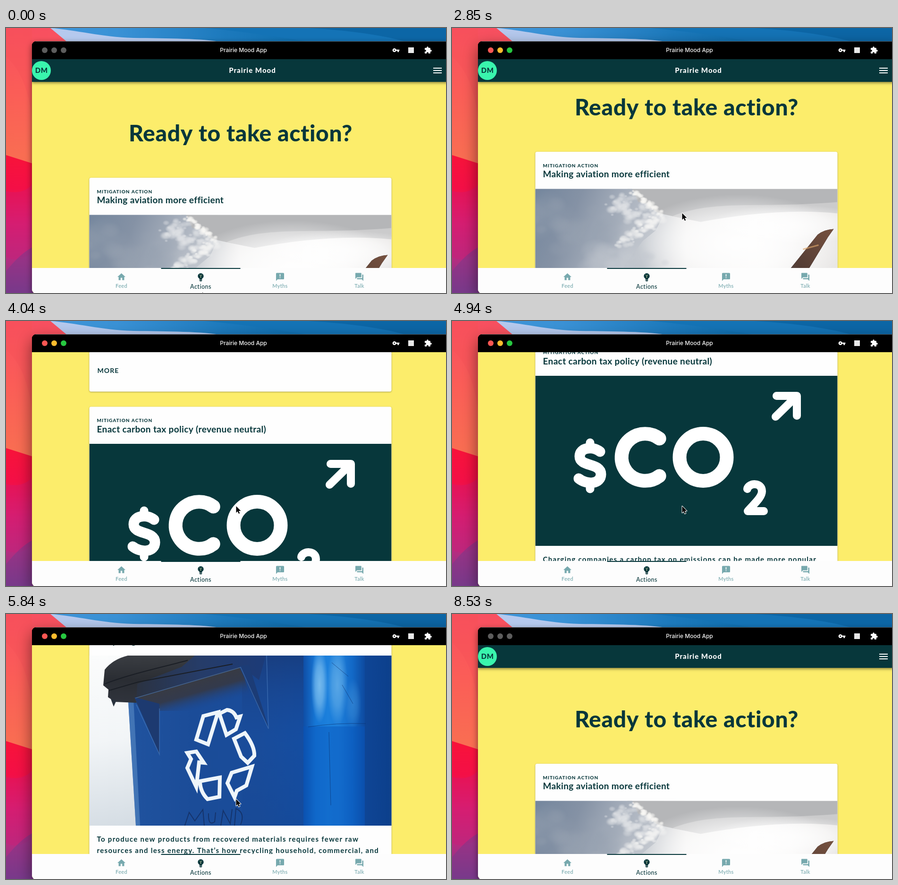
An HTML page with a canvas that plays this animation: 932x561 px, repeating every 8.55 s.

```html
<!DOCTYPE html>
<html lang="en">
<head>
<meta charset="utf-8">
<title>Prairie Mood App</title>
<style>
html, body { margin: 0; width: 100%; height: 100%; overflow: hidden; background: #07373b; }
canvas { display: block; width: 100vw; height: 100vh; }
</style>
</head>
<body>
<canvas id="stage" width="932" height="561"></canvas>
<script>
const ctx = document.getElementById('stage').getContext('2d');
const LOOP = 8550, W = 932, H = 561;
const DARK = '#07373b', YELLOW = '#fced6b', TEAL = '#77a9ae', FONT = 'Lato, sans-serif';
const LEFT = 176.5, CARD_W = 640, IMG_H = 360;

// Rows: time, scroll offset
const SCROLL = [
  [2700, 0], [2850, 55], [3000, 190], [3150, 350], [3300, 470], [3440, 565.5],
  [3740, 700], [4040, 790], [4340, 848], [4640, 880], [4790, 880], [4940, 934],
  [5090, 1090], [5240, 1260], [5390, 1400], [5540, 1510], [5690, 1585], [5840, 1616.5],
  [6440, 1616.5], [6590, 1250], [6740, 350], [6890, -24.5], [7040, -15], [7190, -7],
  [7340, -2], [7490, 0]
];
// Rows: time, app bar offset
const BAR = [[2850, 0], [3000, -28], [3150, -56], [6440, -56], [6590, -30], [6740, -4], [6890, 0]];
// Rows: time, pointer x, pointer y
const POINTER = [
  [0, 416, 559.5], [300, 411, 546], [600, 400, 530], [750, 400, 530], [1050, 412, 529],
  [1200, 422, 531], [1650, 422, 531], [1800, 432, 515], [2100, 470, 440], [2400, 487.5, 392]
];

const CARDS = [
  { title: 'Making aviation more efficient', paint: paintWing, lines: [
    'Various technologies and operational practices such as using better',
    'engines, wingtips, and light weighting to improve fuel efficiency can lower',
    'airplane emissions.'] },
  { title: 'Enact carbon tax policy (revenue neutral)', paint: paintTax, lines: [
    'Charging companies a carbon tax on emissions can be made more popular',
    'by returning the money raised to households, so that most people do not',
    'pay more overall.'] },
  { title: 'Recycling', paint: paintBin, lines: [
    'To produce new products from recovered materials requires fewer raw',
    'resources and less energy. That’s how recycling household, commercial, and',
    'industrial waste lowers emissions.'] }
];

const ICON = {
  key: 'M12.65 10C11.83 7.67 9.61 6 7 6c-3.31 0-6 2.69-6 6s2.69 6 6 6c2.61 0 4.83-1.67 5.65-4H17v4h4v-4h2v-4H12.65zM7 14c-1.1 0-2-.9-2-2s.9-2 2-2 2 .9 2 2-.9 2-2 2z',
  puzzle: 'M20.5 11H19V7c0-1.1-.9-2-2-2h-4V3.5C13 2.12 11.88 1 10.5 1S8 2.12 8 3.5V5H4c-1.1 0-2 .9-2 2v3.8h1.5c1.49 0 2.7 1.21 2.7 2.7s-1.21 2.7-2.7 2.7H2V20c0 1.1.9 2 2 2h3.8v-1.5c0-1.49 1.21-2.7 2.7-2.7s2.7 1.21 2.7 2.7V22H17c1.1 0 2-.9 2-2v-4h1.5c1.38 0 2.5-1.12 2.5-2.5S21.88 11 20.5 11z',
  home: 'M10 20v-6h4v6h5v-8h3L12 3 2 12h3v8z',
  myth: 'M20 2H4c-1.1 0-2 .9-2 2v18l4-4h14c1.1 0 2-.9 2-2V4c0-1.1-.9-2-2-2zm-7 9h-2V5h2v6zm0 4h-2v-2h2v2z',
  talk: 'M21 6h-2v9H6v2c0 .55.45 1 1 1h11l4 4V7c0-.55-.45-1-1-1zm-4 6V3c0-.55-.45-1-1-1H3c-.55 0-1 .45-1 1v14l4-4h10c.55 0 1-.45 1-1z',
  bulb: 'M12 3c-4 0-7.2 3.1-7.2 7 0 2.8 1.6 5 3.9 6.2V19h6.6v-2.8c2.3-1.2 3.9-3.4 3.9-6.2 0-3.9-3.2-7-7.2-7zM8.7 20h6.6v1.5l-1.5 1.5h-3.6l-1.5-1.5z',
  arrow: 'M0 0V14L3.2 11 5.5 16 7.700 15 5.500 10.100H9.900z'
};
for (const k in ICON) ICON[k] = new Path2D(ICON[k]);

function valuesAt(rows, t) {
  const i = rows.findIndex(r => r[0] > t);
  if (i < 0) return rows[rows.length - 1].slice(1);
  if (i === 0) return rows[0].slice(1);
  const a = rows[i - 1], b = rows[i], k = (t - a[0]) / (b[0] - a[0]);
  return a.slice(1).map((v, j) => v + (b[j + 1] - v) * k);
}

// The picture advances in held steps of about 150 ms.
function hold(t) {
  if (t < 3440) return Math.min(3300, Math.floor(t / 150) * 150);
  return 3440 + Math.floor((t - 3440) / 150) * 150;
}

function rect(x, y, w, h, fill) { ctx.fillStyle = fill; ctx.fillRect(x, y, w, h); }
function disc(x, y, r, fill) {
  ctx.fillStyle = fill; ctx.beginPath(); ctx.arc(x, y, r, 0, 7); ctx.fill();
}
function round(x, y, w, h, r) { ctx.beginPath(); ctx.roundRect(x, y, w, h, r); }
function fillPath(d, fill) { ctx.fillStyle = fill; ctx.fill(new Path2D(d)); }
function strokePath(d, width, color) {
  ctx.lineWidth = width; ctx.strokeStyle = color; ctx.stroke(new Path2D(d));
}
function grad(x0, y0, x1, y1, ...colors) {
  const g = ctx.createLinearGradient(x0, y0, x1, y1);
  colors.forEach((c, i) => g.addColorStop(i / (colors.length - 1), c));
  return g;
}
function blob(x, y, r, rgb, alpha, squash = 1) {
  ctx.save();
  ctx.translate(x, y); ctx.scale(1, squash);
  const g = ctx.createRadialGradient(0, 0, 0, 0, 0, r);
  g.addColorStop(0, `rgba(${rgb},${alpha})`);
  g.addColorStop(.5, `rgba(${rgb},${alpha * .7})`);
  g.addColorStop(1, `rgba(${rgb},0)`);
  disc(0, 0, r, g);
  ctx.restore();
}
function text(s, x, y, font, color, spacing = 0, align = 'left') {
  ctx.font = font; ctx.fillStyle = color; ctx.textAlign = align;
  ctx.letterSpacing = spacing + 'px';
  ctx.fillText(s, x, y);
  ctx.letterSpacing = '0px';
}
function icon(path, cx, cy, size, color) {
  ctx.save();
  ctx.translate(cx - size / 2, cy - size / 2); ctx.scale(size / 24, size / 24);
  ctx.fillStyle = color; ctx.fill(path);
  ctx.restore();
}
function random(seed) {
  return () => (seed = (seed * 16807) % 2147483647) / 2147483647;
}
// Scatters soft puffs around a line.
function puffs(seed, n, x0, y0, x1, y1, spread, size, rgb, alpha) {
  const rnd = random(seed * 7919);
  for (let i = 0; i < n; i++) {
    const k = rnd();
    blob(x0 + (x1 - x0) * k + (rnd() + rnd() - 1) * spread, y0 + (y1 - y0) * k + (rnd() + rnd() - 1) * spread,
      size * (.4 + rnd()), rgb, alpha, .75);
  }
}

function wallpaper() {
  rect(0, 0, W, H, grad(0, 0, 700, 0, '#3f97dc', '#3a92d6', '#1c79bc', '#0869a8'));
  fillPath('M420 0C520 8 600 24 650 30H932V0z', '#1473b6');
  fillPath('M640 0C700 3 790 12 850 30H932V0z', '#0c66a6');
  fillPath('M92 0C150 4 200 19 270 21C340 22 420 22 456 30H100z', '#b5c9ee');
  fillPath('M0 0H94L130 30L140 561H0z', grad(0, 0, 0, 270, '#f84f60', '#fb5d57', '#f96d52'));
  fillPath('M0 60Q45 100 55 190V0H0z', 'rgba(245,80,85,.4)');
  fillPath('M0 269L60 288V561H0z', grad(0, 265, 0, 561, '#f81339', '#f40f46', '#d91f70', '#b72c80', '#78398a'));
  fillPath('M0 345Q40 355 60 325V470Q30 500 0 485z', 'rgba(206,25,115,.32)');
  fillPath('M0 515Q32 475 60 462V561H0z', 'rgba(120,58,140,.5)');
}

function paintWing() {
  rect(0, 0, 640, 360, grad(0, 0, 640, 0, '#7b8ba0', '#a0a9b5', '#efeeed', '#f8f7f6', '#e8e6e5'));
  // grey upper sky with a bright bank below it
  fillPath('M195 0H640V48C560 36 480 42 410 55C330 72 270 60 215 30z', '#b5b6b8');
  fillPath('M290 58C380 22 470 42 640 28V52C540 42 440 54 350 70z', '#cbcbcc');
  blob(430, 115, 230, '255,255,255', .95, .45);
  blob(540, 75, 170, '255,255,255', .75, .25);
  // lit cloud edge
  fillPath('M0 0H205L218 28L242 32L268 62L255 88L228 110L190 160L150 260H0z', grad(0, 0, 260, 110, '#74869d', '#8592a5', '#a9b1bd', '#c9cdd3'));
  puffs(11, 30, 20, 60, 150, 120, 70, 34, '150,161,176', .3);
  puffs(5, 90, 165, 30, 250, 65, 28, 9, '226,228,231', .5);
  puffs(23, 70, 262, 60, 185, 115, 16, 8, '244,244,243', .6);
  puffs(41, 40, 205, 4, 262, 50, 8, 6, '250,249,246', .7);
  puffs(31, 30, 110, 160, 260, 140, 40, 26, '196,201,208', .3);
  // clouds beneath
  rect(270, 225, 370, 135, grad(0, 225, 0, 360, '#a7a2a1', '#8d8788', '#6a666a'));
  puffs(9, 40, 440, 345, 640, 335, 30, 26, '84,80,86', .4);
  puffs(17, 70, 360, 330, 470, 265, 34, 20, '238,230,224', .45);
  puffs(19, 50, 480, 285, 640, 290, 26, 18, '206,199,195', .35);
  puffs(29, 36, 365, 345, 425, 310, 22, 12, '250,244,239', .5);
  // wing
  fillPath('M0 220C170 214 330 216 455 235L541 168L598 97Q612 86 632 85L620 102L580 168L500 240L425 262L330 292L160 360H0z',
    grad(0, 215, 150, 360, '#626b79', '#525a67', '#353b46'));
  fillPath('M541 168L598 97Q612 86 632 85L620 102L580 168L512 224L455 235z', grad(630, 85, 480, 235, '#76513f', '#543d35', '#59616c'));
  strokePath('M567 128L600 119', 3, 'rgba(218,164,105,.65)');
  strokePath('M0 290L180 258L455 240M0 262L150 238M100 318L310 274L425 258M90 246L140 282M185 257L235 288M300 248L330 268', 1.2, 'rgba(25,30,40,.6)');
  fillPath('M0 310C50 320 100 340 145 360H0z', '#50555f');
  strokePath('M0 306C60 318 120 338 160 357', 2, '#242832');
  strokePath('M98 318L162 347', 6, '#20242c');
  strokePath('M205 309L300 300', 3, '#272b33');
  // pods
  fillPath('M190 347C225 332 250 312 285 304L295 298L310 297C345 310 372 324 380 333Q383 341 370 344C320 350 250 344 190 347z', grad(0, 297, 0, 348, '#4b4b50', '#27272c'));
  fillPath('M385 258C420 246 435 236 470 234H520Q530 238 526 246C510 254 480 258 450 256C425 262 405 264 385 258z', grad(0, 234, 0, 262, '#5a5a5e', '#3c3c41'));
  ctx.strokeStyle = '#25282d'; ctx.lineWidth = 1.5;
  round(434, 244, 12, 7, 3); ctx.stroke();
}

function paintTax() {
  rect(0, 0, 640, 360, DARK);
  ctx.save();
  ctx.translate(-177, -116.5);
  ctx.lineCap = ctx.lineJoin = 'round';
  strokePath('M314 277C298 265 271 268 271 287C271 310 316 300 316 325C316 346 286 348 269 334', 22, '#fff');
  strokePath('M293 258V266M293 345V356', 18, '#fff');
  ctx.lineWidth = 29;
  ctx.beginPath(); ctx.arc(409.5, 289, 49.8, .92, Math.PI * 2 - .92); ctx.stroke();
  ctx.beginPath(); ctx.arc(532.5, 289, 50, 0, 7); ctx.stroke();
  strokePath('M626 356C629 343 657 341 657 361C657 374 640 388 627 403H661', 17, '#fff');
  strokePath('M688 159H731V201M731 159L686 203', 17, '#fff');
  ctx.restore();
}

function paintBin() {
  rect(0, 0, 640, 360, grad(0, 0, 60, 360, '#fbfcfc', '#f2f5f7', '#d5dde4'));
  ctx.save();
  ctx.translate(-176.5, -88);
  // body
  fillPath('M258 170L275 448H820V88H280z', grad(258, 0, 818, 0, '#20539f', '#1b4c98', '#194c9a', '#124ea4', '#0c3f8b'));
  fillPath('M258 170L275 448H284L270 180z', 'rgba(100,150,205,.5)');
  rect(500, 88, 130, 360, grad(0, 88, 0, 448, 'rgba(25,45,95,.45)', 'rgba(25,75,160,.1)', 'rgba(16,58,130,.15)'));
  // bright rib
  rect(630, 88, 130, 360, grad(630, 0, 760, 0, '#0f4ea6', '#1677d6', '#1c80dc', '#1c7cd8', '#1268c6', '#0e4a9f'));
  blob(664, 150, 18, '150,208,244', .75, 4.5);
  blob(702, 150, 22, '120,188,236', .65, 4);
  blob(735, 190, 18, '70,150,220', .5, 3);
  rect(630, 238, 130, 210, 'rgba(8,84,186,.45)');
  strokePath('M640 239Q700 230 762 232M684 250L688 405M690 103L725 132M712 150L735 190', 1, 'rgba(10,45,105,.6)');
  // rim, then lid
  fillPath('M270 120L400 88H550L536 140L500 112L275 183z', grad(270, 0, 550, 0, '#2b3240', '#263c68', '#1c3b78'));
  fillPath('M258 88H400L372 112L278 148L276 188L231 186L216 176L217 160L206 151L209 118Q226 96 258 88z', grad(0, 88, 0, 190, '#3a3d42', '#2a2d33', '#30343d'));
  strokePath('M209 148C260 128 310 118 385 98M218 162L280 144L480 106', 2, '#1a1e25');
  fillPath('M222 180L228 196L234 183z', '#29323e');
  fillPath('M272 178L497 112L528 205H285z', grad(380, 135, 400, 205, '#3a3b40', '#333a4c', 'rgba(27,70,145,0)'));
  fillPath('M272 176L325 190V297z', '#1d3a70');
  fillPath('M493 110L515 108L557 243z', '#1c3c76');
  strokePath('M274 178L497 113L556 243M325 200V297L276 192M552 88L556 243', 1.5, 'rgba(75,125,190,.6)');
  // painted loop
  ctx.lineJoin = 'miter';
  strokePath('M403 266L418 216L449 208L428 276z'
    + 'M452 211L468 203Q482 204 488 219L496 217L487 244L467 256z'
    + 'M483 264L506 252Q527 280 526 300L512 315L498 302z'
    + 'M521 323L509 363L489 374L484 388L469 358L478 336z'
    + 'M411 354L453 346L452 387L427 392Q411 376 411 354z'
    + 'M384 294L403 291L419 315L409 314L403 366L384 326L392 307z', 8, '#eef5fa');
  strokePath('M378 450L388 420L400 438L417 414L420 448M429 422Q428 450 442 440L444 420M455 448L460 416L475 444L479 413M484 448L487 412Q507 420 497 446', 2, 'rgba(18,35,78,.6)');
  ctx.restore();
}

function drawCard(card, top) {
  if (top > H || top + 623 < 60) return;
  ctx.save();
  ctx.shadowColor = 'rgba(0,0,0,.35)'; ctx.shadowBlur = 3; ctx.shadowOffsetY = 1;
  ctx.fillStyle = '#fefefe';
  round(LEFT, top, CARD_W, 622.5, 4); ctx.fill();
  ctx.restore();
  const x = LEFT + 16, img = top + 78.5, end = img + IMG_H;
  text('MITIGATION ACTION', x, top + 32.5, `800 10px ${FONT}`, DARK, 1);
  text(card.title, x, top + 54, `700 19px ${FONT}`, DARK, .35);
  ctx.save();
  ctx.translate(LEFT, img);
  ctx.beginPath(); ctx.rect(0, 0, CARD_W, IMG_H); ctx.clip();
  card.paint();
  ctx.restore();
  card.lines.forEach((s, i) => text(s, x, end + 34 + i * 24, `700 15px ${FONT}`, DARK, 1.3));
  text('MORE', x + 1, end + 144.5, `700 14px ${FONT}`, DARK, 1.1);
}

function appBar(dy) {
  ctx.save();
  ctx.translate(0, dy);
  ctx.shadowColor = 'rgba(0,0,0,.5)'; ctx.shadowBlur = 6; ctx.shadowOffsetY = 2;
  rect(55, 66, 900, 48, DARK);
  ctx.shadowColor = 'transparent';
  disc(75, 90, 20, '#39f5ad');
  text('DM', 75.3, 94.5, `800 15px ${FONT}`, DARK, .8, 'center');
  text('Prairie Mood', 522, 94.5, `800 15px ${FONT}`, '#fff', 1, 'center');
  for (let i = 0; i < 3; i++) rect(905, 84 + i * 5, 18, 2, '#fff');
  ctx.restore();
}

function bottomNav(dy, t) {
  ctx.save();
  ctx.translate(0, dy);
  rect(55, 508, 900, 60, '#fdfdfd');
  const age = (t - 1350) / 600;
  if (age > 0 && age < 1.4) {
    ctx.save();
    ctx.beginPath(); ctx.rect(328.5, 508, 168, 56); ctx.clip();
    ctx.globalAlpha = .25 * Math.min(1, (1.4 - age) * 1.6);
    disc(422, 531, 20 + 110 * Math.min(1, age), DARK);
    ctx.restore();
  }
  rect(328.5, 508, 168, 2, DARK);
  [['Feed', 'home'], ['Actions', 'bulb'], ['Myths', 'myth'], ['Talk', 'talk']].forEach(([name, shape], i) => {
    const x = 244.5 + i * 168, on = i === 1;
    icon(ICON[shape], x, 527, 20.4, on ? DARK : TEAL);
    if (on) strokePath('M410 522L412.5 525L415 522M412.5 525V529', 1, '#c9cfa0');
    text(name, x, on ? 551.5 : 549.5, `500 ${on ? 12.5 : 11}px ${FONT}`, on ? DARK : TEAL, on ? .5 : .3, 'center');
  });
  ctx.restore();
}

function titleBar(active) {
  rect(55, 28, 900, 38, '#000');
  rect(55, 28, 900, 1, '#4b4b4b');
  ['#fc5753', '#fdbc2e', '#27c840'].forEach((c, i) => disc(82 + i * 20, 47, 6, active ? c : '#5d5d5d'));
  text('Prairie Mood App', 503, 51.3, '500 12px Inter, sans-serif', '#f4f4f4', 0, 'center');
  icon(ICON.key, 826, 47, 16, '#fff');
  rect(852, 41, 12, 12, '#e9e9e9');
  icon(ICON.puzzle, 894, 47, 17, '#fff');
}

function pointer(x, y) {
  ctx.save();
  ctx.translate(x, y);
  ctx.lineJoin = 'round';
  ctx.lineWidth = 2; ctx.strokeStyle = '#fff'; ctx.stroke(ICON.arrow);
  ctx.fillStyle = '#000'; ctx.fill(ICON.arrow);
  ctx.restore();
}

function draw(now) {
  const clock = now % LOOP, ended = clock >= 8530, t = ended ? 0 : hold(clock);
  const [scroll] = valuesAt(SCROLL, t), [bar] = valuesAt(BAR, t);
  const active = t >= 450, pull = Math.max(0, -scroll);

  wallpaper();
  ctx.save();
  ctx.shadowColor = 'rgba(0,0,0,.5)';
  ctx.shadowBlur = active ? 32 : 14; ctx.shadowOffsetY = active ? 12 : 5;
  ctx.fillStyle = '#000';
  round(55, 28, 900, 534, 9); ctx.fill();
  ctx.restore();

  ctx.save();
  round(55, 28, 900, 534, 9); ctx.clip();
  rect(55, 66, 900, 500, '#fff');
  rect(55, 66 + pull, 900, 500, YELLOW);
  text('Ready to take action?', 497, 240 - scroll, `800 48px ${FONT}`, DARK, .65, 'center');
  CARDS.forEach((card, i) => drawCard(card, 317 + i * 654.5 - scroll));
  if (bar > -56) appBar(bar + pull);
  bottomNav(pull, t);
  titleBar(active);
  ctx.restore();

  if (!ended) pointer(...valuesAt(POINTER, t));
  requestAnimationFrame(draw);
}
requestAnimationFrame(draw);
</script>
</body>
</html>
```
